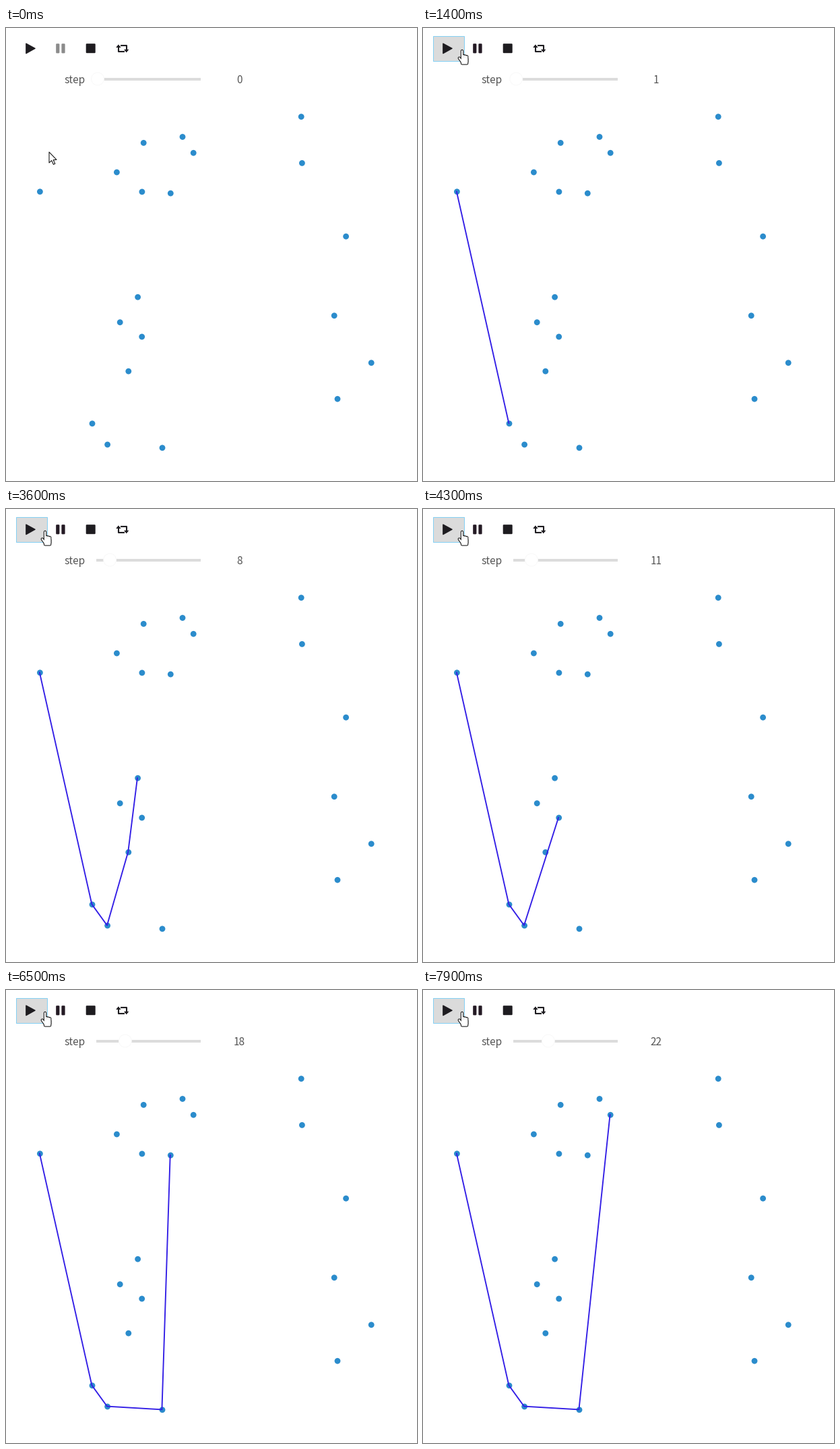
A matplotlib script that plays this animation: 610 by 672 pixels, repeating every 8 s.

```python
import math

import matplotlib.pyplot as plt
from matplotlib.animation import FuncAnimation
from matplotlib.patches import Circle, FancyBboxPatch, Polygon, Rectangle

W, H, DPI = 610, 672, 100
FRAMES, INTERVAL = 80, 100
PX = 72 / DPI  # points per pixel

INK, MUTED, BLUE, LINE = "#1e1c20", "#8b8b8b", "#2b8ccc", "#331ee6"

# The sites whose lower hull is scanned
POINTS = [
    (50.4, 242.8), (128, 586.8), (150.6, 618), (181.8, 509.2), (232, 622.8),
    (169.2, 436.6), (201.7, 458), (195.6, 399.2), (492, 550.3), (542.2, 496.7),
    (487.2, 426.7), (504.6, 309.2), (244.3, 245.2), (201.9, 243), (439.4, 200.4),
    (438.2, 131.6), (278.2, 185.3), (262, 161.5), (204.2, 170.4), (164.4, 214),
]


def cross(a, b, c):
    return (b[0] - a[0]) * (c[1] - b[1]) - (b[1] - a[1]) * (c[0] - b[0])


def hull_steps(points):
    """Every intermediate chain while scanning the points from left to right."""
    chain, steps = [], []
    for p in sorted(points):
        chain.append(p)
        steps.append(chain[:])
        while len(chain) > 2 and cross(*chain[-3:]) >= 0:
            del chain[-2]
            steps.append(chain[:])
    return steps


def step_at(t):
    return max(0, int((t - 825) // 310))


def plot_lag(t):
    """The plot trails the counter at first, then catches up."""
    return max(0, 330 - 0.075 * t)


def pointer_at(t):
    u = min(max((t - 100) / 900, 0), 1)
    e = u * u * (3 - 2 * u)
    return 64 - 6 * e - 40 * math.sin(math.pi * e), 184 - 151 * e


def hand_strokes():
    """Four fingers, a thumb and rows filling the palm, as one broken line."""
    strokes = [((2.4 * k, 1 if k == 0 else 7.4 + 0.6 * k), (2.4 * k, 18)) for k in range(4)]
    strokes.append(((-4.2, 11.6), (0.4, 18)))
    strokes += [((0, y), (7.2, y)) for y in (13, 15, 17, 19.5)]
    gap = (math.nan, math.nan)
    return [p for a, b in strokes for p in (a, b, gap)]


STEPS = hull_steps(POINTS)
HAND = hand_strokes()
ARROW = [(0, 0), (0, 16), (3.7, 12.6), (6.4, 18.4), (8.8, 17.3), (6.2, 11.7), (11, 11.4)]

fig = plt.figure(figsize=(W / DPI, H / DPI), dpi=DPI, facecolor="white")
ax = fig.add_axes([0, 0, 1, 1])
ax.set_xlim(0, W)
ax.set_ylim(H, 0)
ax.axis("off")


def add(patch):
    return ax.add_patch(patch)


def stroke(color, width, zorder, cap="round"):
    return ax.plot([], [], color=color, lw=width * PX, zorder=zorder,
                   solid_capstyle=cap, solid_joinstyle="round")[0]


def rounded(x, y, w, h, color, r=1.2):
    return add(FancyBboxPatch((x, y), w, h, boxstyle=f"round,pad=0,rounding_size={r}",
                              fc=color, ec="none", zorder=3))


def label(x, s, ha):
    return ax.text(x, 82.5, s, ha=ha, va="baseline", color="#565656",
                   family="Noto Sans CJK JP", size=15.4 * PX)


def repeat_icon(cx, cy):
    """A bent arrow and the same arrow turned by half a circle."""
    for s in (1, -1):
        stem = stroke(INK, 2.1, 3, "butt")
        stem.set_data([cx - 5.9 * s, cx - 5.9 * s, cx + 3 * s],
                      [cy - 2.5 * s, cy + 4.7 * s, cy + 4.7 * s])
        head = [(-9.6, -1.4), (-5.9, -6), (-2.2, -1.4)]
        add(Polygon([(cx + s * x, cy + s * y) for x, y in head], fc=INK, ec="none"))


# Toolbar
button = add(Rectangle((15.1, 12.1), 45.5, 36.6, fc="#dbdbdb", ec="#84d0f4", lw=PX))
add(Polygon([(29.8, 23), (43.2, 30.3), (29.8, 37.8)], fc=INK, ec=INK, lw=1.2 * PX,
            joinstyle="round", zorder=3))
bars = [rounded(x, 23.2, 5.2, 14.2, MUTED) for x in (74.2, 82.4)]
rounded(118.7, 23.2, 14, 14, INK)
repeat_icon(172.8, 30.4)

# Slider
label(86, "step", "left")
add(Rectangle((134, 73.8), 155, 4, fc="#dcdcdc", ec="none"))
knob = add(Circle((136, 75.5), 9.4, fc="white", ec="#f9f9f9", lw=PX, zorder=4))
count = label(346.3, "0", "center")

# Plot
for p in POINTS:
    add(Circle(p, 4.4, fc=BLUE, ec="none", zorder=2))
chain_line = stroke(LINE, 1.9, 3)

arrow = add(Polygon(ARROW, fc="white", ec="#161616", lw=1.1 * PX,
                    joinstyle="round", zorder=6))
hand = [stroke("#161616", 4.4, 6), stroke("white", 2.3, 7)]


def draw(i):
    t = i * INTERVAL
    n = step_at(t)
    playing = t >= 1200

    button.set_visible(playing)
    for bar in bars:
        bar.set_facecolor("#241a24" if playing else MUTED)

    knob.center = (136 + 2.27 * n, 75.5)
    count.set_text(str(n))

    shown = step_at(t - plot_lag(t))
    chain_line.set_data([x - 0.6 for x, _ in STEPS[shown]],
                        [y - 0.4 for _, y in STEPS[shown]])
    chain_line.set_visible(shown > 0)

    x, y = pointer_at(t)
    over = y < 49
    arrow.set_xy([(x + dx, y + dy) for dx, dy in ARROW])
    arrow.set_visible(not over)
    for part in hand:
        part.set_data([x + dx for dx, _ in HAND], [y + dy for _, dy in HAND])
        part.set_visible(over)
    return [button, knob, count, chain_line, arrow, *bars, *hand]


anim = FuncAnimation(fig, draw, frames=FRAMES, interval=INTERVAL,
                     repeat=True, repeat_delay=0, blit=False)
plt.show()
```
